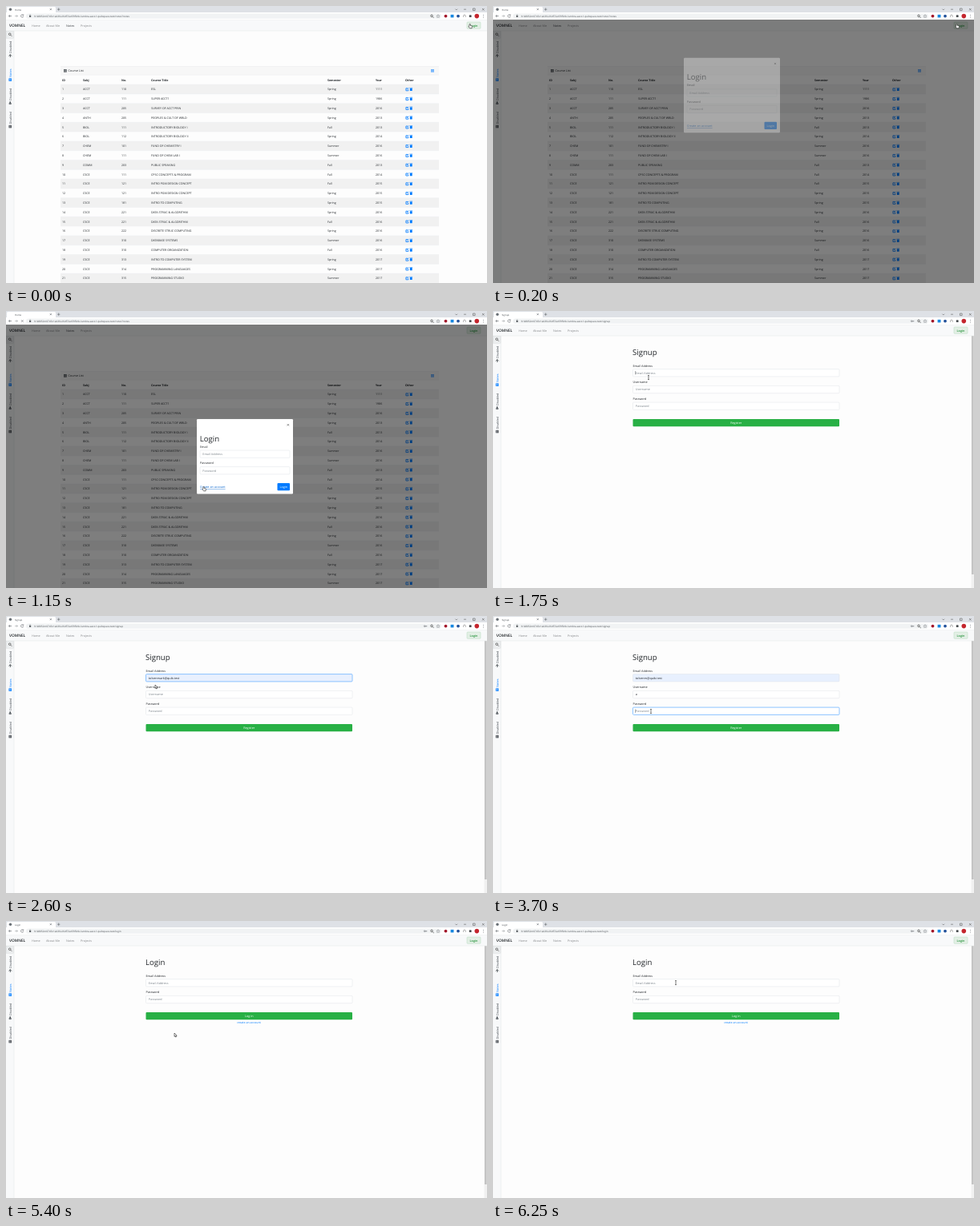
An HTML page for the animation above (6300 ms loop, 600 by 346 pixels).

```html
<!DOCTYPE html>
<html lang="en">
<head>
<meta charset="utf-8">
<title>Course notes</title>
<style>
html, body { margin: 0; width: 100%; height: 100%; overflow: hidden; background: #fff; }
svg { display: block; width: 100vw; height: 100vh; }
text { font-family: "Open Sans", "Noto Sans", sans-serif; text-rendering: geometricPrecision; white-space: pre; }
</style>
</head>
<body>
<svg id="stage" viewBox="0 0 600 346"></svg>
<script>
const LOOP = 6300, BLUE = '#007bff', GREEN = '#28b045', INK = '#212529', GREY = '#7b838a';
const $ = id => document.getElementById(id);

const text = (x, y, s, o = {}) =>
  `<text x="${x}" y="${y}" font-size="${o.size || 3.75}" fill="${o.fill || INK}" font-weight="${o.weight || 400}" text-anchor="${o.anchor || 'start'}" ${o.more || ''}>${s}</text>`;
const rect = (x, y, w, h, fill, more = '') =>
  `<rect x="${x}" y="${y}" width="${w}" height="${h}" fill="${fill}" ${more}/>`;
const dot = (x, y, r, fill) => `<circle cx="${x}" cy="${y}" r="${r}" fill="${fill}"/>`;
const line = (d, stroke = '#5f6368', w = .6) =>
  `<path d="${d}" fill="none" stroke="${stroke}" stroke-width="${w}"/>`;
const group = (id, body, more = '') => `<g id="${id}" ${more}>${body}</g>`;
const lens = (x, y) => line(`M${x + 1} ${y + 1}l1.6 1.6M${x + 1.3} ${y}a1.3 1.3 0 1 1-2.6 0a1.3 1.3 0 1 1 2.6 0`, '#444', .7);

function browser() {
  return rect(0, 0, 600, 8.5, '#dee1e6') +
    rect(1, 1, 61, 8, '#fff', 'rx="1.5"') + rect(0, 8, 600, 9, '#fff') +
    group('favicon', dot(5.5, 4.3, 1.7, '#6b7177')) +
    text(11, 5.5, 'Home', { size: 2.9, fill: '#454a4f', more: 'id="title"' }) +
    line('M54.8 3.2l2 2m0-2l-2 2M64 4.2h3.4m-1.7-1.7v3.4') +
    line('M560.5 3.7l1.3 1.3l1.3-1.3M571 4.2h3M582.5 3h2.6v2.6h-2.6zM594 3l2.6 2.6m0-2.6l-2.6 2.6', '#444', .5) +
    line('M7 12.5H3.5m1.5-1.5l-1.5 1.5l1.5 1.5') +
    line('M11 12.5h3.5m-1.5-1.5l1.5 1.5l-1.5 1.5', '#a5a8ab') +
    group('reload', line('M21.5 11.4a1.7 1.7 0 1 0 .3 1.6M21.8 10.4v1.4h-1.4')) +
    group('stop', line('M19 11.2l2.6 2.6m0-2.6l-2.6 2.6')) +
    rect(25, 9.5, 518, 6.3, '#f1f3f4', 'rx="3.1"') +
    rect(29, 12, 2.2, 1.9, '#5f6368') + line('M29.5 12v-.7a.6.6 0 0 1 1.2 0v.7', '#5f6368', .4) +
    text(35, 13.8, '', { size: 3.1, fill: '#4c5156', more: 'id="url"' }) +
    group('key', line('M525.4 12.6h-2.5v1m1.4-1v.8M522.9 12.6a.8.8 0 1 1-1.6 0a.8.8 0 1 1 1.6 0', '#5f6368', .5)) +
    lens(531, 12.3) +
    line('M539 10.7l.6 1.3 1.4.1-1 1 .3 1.4-1.3-.7-1.3.7.3-1.4-1-1 1.4-.1z', '#5f6368', .4) +
    dot(548.5, 12.6, 1.9, '#a3162b') + rect(554.6, 10.8, 3.9, 3.6, '#1787e0') +
    dot(564, 12.6, 1.9, '#24529b') + line('M570.5 13.8v-1.3a1.4 1.4 0 0 1 2.8 0v1.3', '#777') +
    rect(577.8, 11.2, 2.8, 2.8, '#4a4e52', 'rx=".6"') + dot(587.3, 12.6, 2.8, '#c4262e') +
    [11, 12.6, 14.2].map(y => dot(595.5, y, .45, '#5f6368')).join('');
}

function frame() {
  const side = [['Disabled', 59], ['Notes', 89], ['Disabled', 118], ['Disabled', 147.5]];
  return rect(0, 17, 600, 14, '#f8f9fa') + rect(0, 31, 10, 315, '#f8f9fa') +
    line('M0 17H600M0 31H600M10 31V346', '#e1e4e7', .5) +
    text(4, 25.7, 'VOMNEL', { size: 4.8, weight: 600 }) +
    [['Home', 32], ['About Me', 50], ['Notes', 75], ['Projects', 93]].map(([s, x]) =>
      text(x, 25.5, s, { fill: '#858789', more: s == 'Notes' ? 'id="navNotes"' : '' })).join('') +
    rect(575, 20, 17, 8.3, '#e3efe5', 'rx="1" stroke="#b5d9bd" stroke-width=".5"') +
    text(583.5, 25.5, 'Login', { fill: '#219139', weight: 600, anchor: 'middle' }) +
    rect(.4, 31.4, 9.2, 8.8, '#eceeef', 'stroke="#d5d8da" stroke-width=".4"') + lens(4.7, 35.2) +
    side.map(([s, y], i) => {
      const c = i == 1 ? BLUE : '#444a50';
      const icon = i == 0 ? line(`M5.3 ${y + 1.6}v3.4M3.6 ${y + 3.4}l1.7-1.7l1.7 1.7`, c, .9)
        : i == 2 ? dot(5.2, y + 2.2, .9, c) + rect(3.5, y + 3.2, 3.4, 1.5, c, 'rx=".7"')
        : rect(3.5, y + 1.4, 3.5, 3.4, c) + line(`M4.1 ${y + 2.6}h2.3m-2.3 1h2.3`, '#fff', .4);
      return text(0, 0, s, { fill: c, size: 3.8, more: `transform="translate(6.5 ${y}) rotate(-90)"` }) + icon;
    }).join('');
}

const COURSES = `ACCT|110|ESL|Spring|1111
ACCT|111|SUPER ACCT1|Spring|1986
ACCT|205|SURVEY OF ACCT PRIN|Spring|2016
ANTH|205|PEOPLES &amp; CULT OF WRLD|Spring|2013
BIOL|111|INTRODUCTORY BIOLOGY I|Fall|2013
BIOL|112|INTRODUCTORY BIOLOGY II|Spring|2014
CHEM|101|FUND OF CHEMISTRY I|Summer|2016
CHEM|111|FUND OF CHEM LAB I|Summer|2016
COMM|203|PUBLIC SPEAKING|Fall|2013
CSCE|111|CPSC CONCEPTS &amp; PROGRAM|Fall|2014
CSCE|121|INTRO PGM DESIGN CONCEPT|Fall|2015
CSCE|121|INTRO PGM DESIGN CONCEPT|Spring|2015
CSCE|181|INTRO TO COMPUTING|Spring|2015
CSCE|221|DATA STRUC &amp; ALGORITHM|Spring|2016
CSCE|221|DATA STRUC &amp; ALGORITHM|Fall|2016
CSCE|222|DISCRETE STRUC COMPUTING|Spring|2016
CSCE|310|DATABASE SYSTEMS|Summer|2016
CSCE|310|COMPUTER ORGANIZATION|Fall|2016
CSCE|313|INTRO TO COMPUTER SYSTEM|Spring|2017
CSCE|314|PROGRAMMING LANGUAGES|Spring|2017
CSCE|315|PROGRAMMING STUDIO|Summer|2017`.split('\n').map((r, i) => [i + 1, ...r.split('|')]);
const COLS = [70, 96, 144, 181, 401, 461, 498];

function table() {
  const head = ['ID', 'Subj', 'No.', 'Course Title', 'Semester', 'Year', 'Other'];
  const rows = COURSES.map((r, i) => {
    const y = 104 + i * 11.8;
    return (i % 2 ? '' : rect(68, y - 5.9, 472, 11.8, '#f1f1f1')) +
      line(`M68 ${y - 5.9}H540`, '#e3e6e9', .3) +
      r.map((s, c) => text(COLS[c], y + 1.4, s, { size: 3.6 })).join('') +
      line(`M501.2 ${y - 1.2}h-2.3v3h3v-1.5M500 ${y + .6}l2.3-2.3`, BLUE, .8) +
      rect(503.9, y - 1.1, 2.8, 3.2, BLUE, 'rx=".3"') + line(`M503.5 ${y - 1.6}h3.6`, BLUE, .6);
  }).join('');
  return rect(68, 75.5, 472, 10.7, '#f7f7f7') + line('M68 75.5H540M68 86.2H540', '#e3e5e7', .4) +
    rect(72, 79.2, 3.7, 3.4, '#343a40') + line('M72 80.6h3.7m-3.7 1h3.7M73.8 79.4v3', '#fff', .3) +
    text(77.5, 82.3, 'Course List', { weight: 500 }) +
    line('M530 79.7h4m-4 1.2h4m-4 1.2h4', BLUE, .7) +
    head.map((s, c) => text(COLS[c], 93.6, s, { weight: 700, size: 3.6 })).join('') + rows;
}

const field = (id, x, y, w, hint) =>
  rect(x, y, w, 9.3, '#fff', `rx="1" stroke="#dfe3e7" stroke-width=".5" id="${id}Box"`) +
  text(x + 3.3, y + 6, hint, { fill: GREY, more: `id="${id}"` });
const button = (id, x, y, w, s, fill) =>
  rect(x, y, w, 9.2, fill, `rx="1" id="${id}"`) +
  text(x + w / 2, y + 6, s, { fill: '#fff', anchor: 'middle' });
const heading = (x, y, s) => text(x, y, s, { size: 9.6, weight: 500 });
const scrollbar = rect(596.5, 17, 3.5, 329, '#f1f1f1') + rect(597, 19, 2.7, 310, '#c4c4c4');

function signup() {
  return heading(174, 55.2, 'Signup') +
    text(174.5, 69.5, 'Email Address') + field('email', 174.5, 72.6, 257.5, 'Email Address') +
    text(174.5, 90.2, 'Username') + field('user', 174.5, 93.4, 257.5, 'Username') +
    text(174.5, 111, 'Password') + field('pass', 174.5, 114.1, 257.5, 'Password') +
    button('register', 174.5, 135, 257.5, 'Register', GREEN) +
    line('M0 0v4.4', INK, .4).replace('<path', '<path id="caret"') + scrollbar;
}

function login() {
  return heading(174, 55.2, 'Login') +
    text(174.5, 69.5, 'Email Address') + field('logMail', 174.5, 72.6, 257.5, 'Email Address') +
    text(174.5, 90.2, 'Password') + field('logPass', 174.5, 93.4, 257.5, 'Password') +
    button('enter', 174.5, 114.1, 257.5, 'Log in', GREEN) +
    text(303, 128, 'create an account', { fill: BLUE, anchor: 'middle', size: 3.6 }) + scrollbar;
}

function modal() {
  return rect(238, 135, 120, 93.5, '#fff', 'rx="1.2"') +
    line('M350.8 141.2l2.2 2.2m0-2.2l-2.2 2.2', '#444', .6) +
    heading(241.8, 162.7, 'Login') +
    text(242, 170.6, 'Email') + field('mMail', 242, 174, 112, 'Email Address') +
    text(242, 191.3, 'Password') + field('mPass', 242, 194.6, 112, 'Password') +
    text(242, 221.4, 'Create an account', { fill: '#0062cc', more: 'text-decoration="underline"' }) +
    button('go', 338.5, 215, 15.5, 'Login', BLUE);
}

function cursor() {
  const shape = (id, d) => `<path id="${id}" d="${d}" fill="#fff" stroke="#111" stroke-width=".55" stroke-linejoin="round"/>`;
  return shape('arrow', 'M-1-2v4.4l1-.9.7 1.5.8-.4-.7-1.4h1.4z') +
    shape('hand', 'M-.8-2.4q.5-.5 1 0v1.7l1.8.5q.6.2.5.8l-.4 2.2h-2.6l-1.5-2q0-.8.7-.5z') +
    group('beam', line('M-1-2.5h.7l.3.4.3-.4h.7M0-2.2v4.6M-1 2.6h.7l.3-.4.3.4h.7', '#111', .55));
}

$('stage').innerHTML = rect(0, 0, 600, 346, '#fdfdfd') + group('list', table()) +
  group('signup', signup()) + group('login', login()) + frame() +
  rect(0, 17, 600, 329, '#000', 'id="shade"') + group('modal', modal()) +
  browser() + group('cursor', cursor());

// time, x, y, pointer shape
const PATH = [
  [0, 579, 25, 'hand'], [550, 579, 25, 'arrow'], [1100, 247, 222, 'hand'], [1350, 247, 222, 'arrow'],
  [1700, 194, 83, 'beam'], [2000, 194, 83, 'arrow'], [2300, 187, 88, 'arrow'], [2700, 187, 88, 'arrow'],
  [3050, 199, 98, 'beam'], [3400, 199, 98, 'beam'], [3700, 197, 119, 'beam'], [4250, 197, 119, 'arrow'],
  [4600, 211, 142, 'hand'], [5000, 211, 142, 'arrow'], [5600, 211, 142, 'arrow'], [6200, 228, 77, 'beam']
];
const clamp = v => Math.max(0, Math.min(1, v));
const ease = v => v * v * (3 - 2 * v);
const show = (id, on) => $(id).style.display = on ? '' : 'none';
const set = (id, o) => { for (const k in o) $(id).setAttribute(k, o[k]); };

function fill(id, value, hint) {
  $(id).textContent = value || hint;
  set(id, { fill: value ? INK : GREY });
}

function draw(t) {
  const page = t < 1350 ? 'list' : t < 4950 ? 'signup' : 'login';
  for (const p of ['list', 'signup', 'login']) show(p, p == page);
  const loading = t >= 1100 && t < 1350;
  show('favicon', !loading);
  show('reload', !loading);
  show('stop', loading);
  show('key', page != 'list');
  $('title').textContent = { list: 'Home', signup: 'Signup', login: 'Login' }[page];
  $('url').textContent = 'h1k8852m87d3c1ab36c26df72e6f95b9c.lumbra-east-1.quibspace.test/' +
    { list: 'notes?notes', signup: 'signup', login: 'login' }[page];
  set('navNotes', { fill: page == 'list' ? '#3c4044' : '#858789' });

  const open = page == 'list';
  show('shade', open);
  show('modal', open && t > 170);
  set('shade', { opacity: .5 * clamp((t - 50) / 150) });
  const drop = 1 - (1 - clamp((t - 175) / 300)) ** 1.7;
  set('modal', { opacity: clamp((t - 165) / 110), transform: `translate(0 ${-82 * (1 - drop)})` });

  fill('email', t < 2300 ? '' : t < 2750 ? 'tolvenmark@quib.test' : 'tolvenm@quib.test', 'Email Address');
  fill('user', t < 3250 ? '' : 'a', 'Username');
  fill('pass', '•'.repeat(4 * clamp((t - 3700) / 400)), 'Password');
  const focus = t < 1650 ? '' : t < 3100 ? 'email' : t < 3700 ? 'user' : t < 4600 ? 'pass' : '';
  for (const id of ['email', 'user', 'pass']) {
    const on = id == focus && (id != 'email' || t >= 2000);
    set(id + 'Box', {
      stroke: on ? '#80bdff' : '#dfe3e7', 'stroke-width': on ? .9 : .5,
      fill: id == 'email' && t >= 2300 ? '#e8f0fe' : '#fff'
    });
  }
  show('caret', focus && !(focus == 'email' && t >= 2300));
  if (focus) {
    const typed = $(focus).getAttribute('fill') == INK;
    const x = 177.6 + (typed && page == 'signup' ? $(focus).getComputedTextLength() + .3 : 0);
    set('caret', { transform: `translate(${x} ${{ email: 75, user: 95.8, pass: 116.5 }[focus]})` });
  }
  set('register', { fill: t >= 4550 ? '#21943a' : GREEN });

  const i = PATH.findLastIndex(p => p[0] <= t), a = PATH[i], b = PATH[i + 1] || a;
  const k = b == a ? 0 : ease((t - a[0]) / (b[0] - a[0]));
  set('cursor', { transform: `translate(${a[1] + (b[1] - a[1]) * k} ${a[2] + (b[2] - a[2]) * k})` });
  for (const s of ['arrow', 'hand', 'beam']) show(s, s == a[3]);
}

const start = performance.now();
function tick() {
  draw((performance.now() - start) % LOOP);
  requestAnimationFrame(tick);
}
tick();
</script>
</body>
</html>
```
